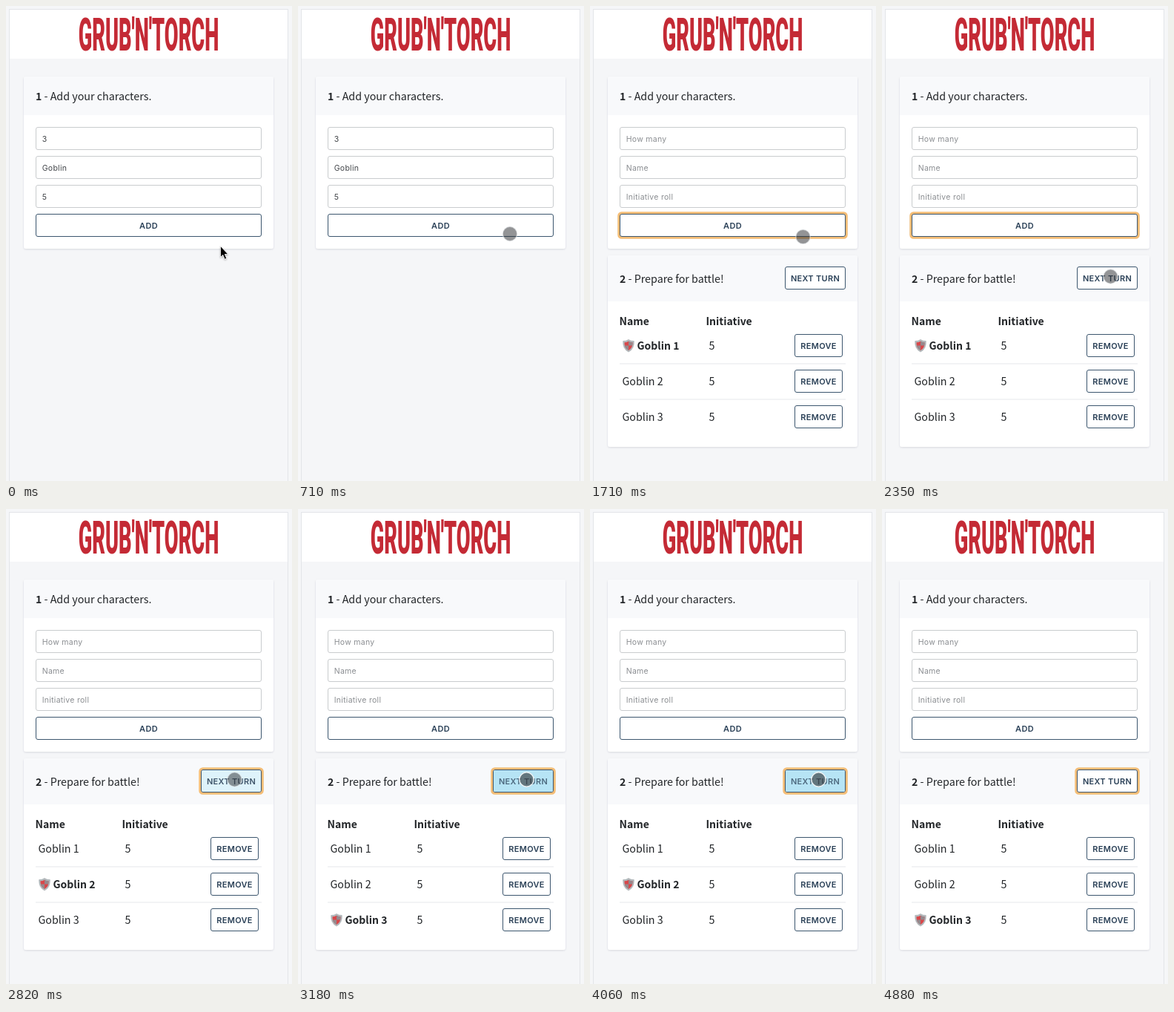
Write an HTML page that moves like this. It is 386x640 px and loops after 7470 ms.

```html
<!DOCTYPE html>
<html lang="en">
<head>
<meta charset="utf-8">
<title>Turn tracker</title>
<style>
  html, body { margin: 0; width: 100%; height: 100%; overflow: hidden; background: #f5f6f8; }
  svg { display: block; width: 386px; height: 640px; }
  text { font-family: "Noto Sans CJK JP", "Noto Sans CJK SC", "Noto Sans CJK KR", "Noto Sans CJK", "Noto Sans", sans-serif; font-size: 14.3px; fill: #222528; white-space: pre; }
  .bold { font-weight: 700; font-size: 14px; }
  .ui { font-family: Inter, sans-serif; font-size: 10.5px; letter-spacing: .28px; fill: #44474b; }
  .hint { fill: #8a8d91; }
  .btn text { font-family: Inter, sans-serif; font-size: 11px; font-weight: 600; letter-spacing: .3px; text-anchor: middle; fill: #2a4057; }
  .btn .face { fill: #fff; stroke: #3c566e; }
  .glow { fill: none; stroke: #f4bd76; stroke-width: 3.5; filter: url(#soft); }
  .logo { font-family: Roboto, sans-serif; font-weight: 900; font-size: 27.2px; text-anchor: middle; fill: #c42a35; }
</style>
</head>
<body>
<svg id="stage" viewBox="0 0 386 640">
  <defs>
    <filter id="soft" x="-10%" y="-30%" width="120%" height="160%"><feGaussianBlur stdDeviation=".7"/></filter>
    <filter id="lift" x="-5%" y="-5%" width="110%" height="110%">
      <feDropShadow dx="0" dy="1" stdDeviation="1.2" flood-color="#20303c" flood-opacity=".14"/>
    </filter>
    <filter id="drop" x="-50%" y="-50%" width="200%" height="200%">
      <feDropShadow dx="0" dy="1" stdDeviation="1" flood-opacity=".35"/>
    </filter>
  </defs>
</svg>
<script>
const LOOP = 7470;
const stage = document.getElementById('stage');

function add(parent, tag, attrs = {}, content) {
  const node = document.createElementNS('http://www.w3.org/2000/svg', tag);
  for (const key in attrs) node.setAttribute(key, attrs[key]);
  if (content !== undefined) node.textContent = content;
  parent.append(node);
  return node;
}
const rect = (parent, x, y, width, height, fill, more) =>
  add(parent, 'rect', { x, y, width, height, fill, ...more });
const text = (parent, x, y, content, cls = '') =>
  add(parent, 'text', { x, y, class: cls }, content);
const show = (node, on) => node.setAttribute('visibility', on ? 'inherit' : 'hidden');

function card(y, height, head, number, title) {
  const g = add(stage, 'g');
  rect(g, 24, y, 337, height, '#fff', { rx: 3, filter: 'url(#lift)' });
  add(g, 'path', { d: `M24 ${y + head}v${3 - head}q0-3 3-3h331q3 0 3 3v${head - 3}z`, fill: '#f8f9fb' });
  const label = text(g, 40, y + head / 2 + 5.8, '');
  add(label, 'tspan', { class: 'bold' }, number);
  add(label, 'tspan', {}, ' - ' + title);
  return g;
}

function button(parent, x, y, width, label) {
  const g = add(parent, 'g', { class: 'btn' });
  const glow = rect(g, x - 1.5, y - 1.5, width + 3, 33, 'none', { rx: 3.5, class: 'glow' });
  rect(g, x, y, width, 30, '#fff', { rx: 2.5, class: 'face' });
  const tint = rect(g, x + .5, y + .5, width - 1, 29, '#b6e4f5', { rx: 2 });
  const caption = text(g, x + width / 2, y + 19.5, label);
  const light = amount => {
    tint.setAttribute('opacity', amount);
    caption.setAttribute('opacity', 1 - .25 * amount);
  };
  show(glow, false);
  light(0);
  return { glow, light };
}

function shield(parent, y) {
  const g = add(parent, 'g', { transform: `translate(52 ${y})` });
  add(g, 'path', { d: 'M0-8Q3-5.8 7.3-6Q8 4.5 0 8.6Q-8 4.5-7.3-6Q-3-5.8 0-8z', fill: '#b4babd', stroke: '#979da1', 'stroke-width': .5 });
  add(g, 'path', { d: 'M0-5.8Q2.5-4.3 5.5-4.3Q5.8 3.4 0 6.5Q-5.8 3.4-5.5-4.3Q-2.5-4.3 0-5.8z', fill: '#d8474a' });
  add(g, 'path', { d: 'M0-5.8V0H5.2Q5.6-2 5.5-4.3Q2.5-4.3 0-5.8zM0 0V6.5Q-4.2 4.2-5.2 0z', fill: '#95888c' });
  return g;
}

// Page and header
rect(stage, 0, 0, 386, 640, '#f5f6f8');
rect(stage, 4.5, 4.5, 376, 645, '#f5f6f8', { stroke: '#e3e5e9' });
rect(stage, 5, 5, 375, 66, '#fff');
add(stage, 'text', { class: 'logo', transform: 'translate(192.5 60) scale(1 2.25)' }, "GRUB'N'TORCH");

// Character form
const form = card(95, 232, 52, '1', 'Add your characters.');
const fields = [['3', 'How many'], ['Goblin', 'Name'], ['5', 'Initiative roll']].map(([value, hint], i) => {
  const y = 163.5 + 39 * i;
  rect(form, 40.5, y, 304, 30, '#fff', { rx: 2.5, stroke: '#c9ccce' });
  return {
    value: text(form, 48.7, y + 19.5, value, 'ui'),
    hint: text(form, 48.7, y + 19.5, hint, 'ui hint')
  };
});
const addBtn = button(form, 40.5, 280.5, 304, 'ADD');

// Battle list
const battle = card(336, 258, 62, '2', 'Prepare for battle!');
const nextBtn = button(battle, 263.5, 351.5, 81, 'NEXT TURN');
text(battle, 39.5, 430, 'Name', 'bold');
text(battle, 156.5, 430, 'Initiative', 'bold');
const rows = [1, 2, 3].map((n, i) => {
  const y = 458 + 48 * i;
  if (i) rect(battle, 40, y - 24.5, 305, 1, '#e6e8eb');
  const idle = text(battle, 43.5, y + 5.3, 'Goblin ' + n);
  const active = add(battle, 'g');
  shield(active, y - .5);
  text(active, 63.5, y + 5.3, 'Goblin ' + n, 'bold');
  text(battle, 160.5, y + 5.3, '5');
  button(battle, 276.5, y - 15.5, 64, 'REMOVE');
  return { idle, active };
});

// Pointer
const arrow = add(stage, 'path', {
  d: 'M289.5 323.5v15l3.3-3.1 2.4 5.8 2.5-1.1-2.4-5.6h4.4z',
  fill: '#000', stroke: '#fff', 'stroke-width': .8, filter: 'url(#drop)'
});
const dot = add(stage, 'circle', { r: 9.7, fill: '#303236', stroke: '#eef2f4', 'stroke-width': 1.4 });

// Each press: pointer down, button lit, fading, released, row made active
const presses = [
  [1120, 1180, 1290, 1350, 0],
  [2760, 2760, 2820, 2880, 1],
  [3180, 3180, 3290, 3350, 2],
  [3650, 3650, 3760, 3820, 0],
  [4060, 4060, 4180, 4240, 1],
  [4470, 4530, 4590, 4650, 2]
];

// Progress 0..1 in even steps, the first one taken at the start time
function steps(t, from, to, count) {
  if (t < from) return 0;
  return Math.min(1, (Math.floor((t - from) / (to - from) * (count - 1) + 1e-6) + 1) / count);
}
const ease = p => .75 * p + .25 * p * p * (3 - 2 * p);

function draw(t) {
  let turn = -1, lit = 0, down = false;
  for (const [press, light, fade, end, row] of presses) {
    if (t >= light) turn = row;
    if (t >= press && t < fade) down = true;
    if (t >= light && t < end) lit = t < fade ? 1 : .45;
  }
  const added = t >= 1180, onNext = t >= 2760;

  for (const f of fields) {
    show(f.value, !added);
    show(f.hint, added);
  }
  show(battle, added);
  show(addBtn.glow, added && !onNext);
  show(nextBtn.glow, onNext);
  addBtn.light(onNext ? 0 : lit);
  nextBtn.light(onNext ? lit : 0);
  rows.forEach((row, i) => {
    show(row.idle, i !== turn);
    show(row.active, i === turn);
  });

  const a = ease(steps(t, 530, 710, 4)), b = ease(steps(t, 1710, 2350, 12));
  dot.setAttribute('cx', 290 - 4 * a + 22.5 * b);
  dot.setAttribute('cy', 326 - 19 * a + 57.5 * b);
  dot.setAttribute('fill-opacity', down ? .62 : .52);
  dot.setAttribute('stroke-opacity', down ? 1 : .5);
  dot.setAttribute('opacity', t < 4820 ? 1 : .4);
  show(dot, t >= 60 && t < 4880);
  show(arrow, t < 60);
}

let start;
function tick(now) {
  if (start === undefined) start = now;
  draw((now - start) % LOOP);
  requestAnimationFrame(tick);
}
draw(0);
requestAnimationFrame(tick);
</script>
</body>
</html>
```
